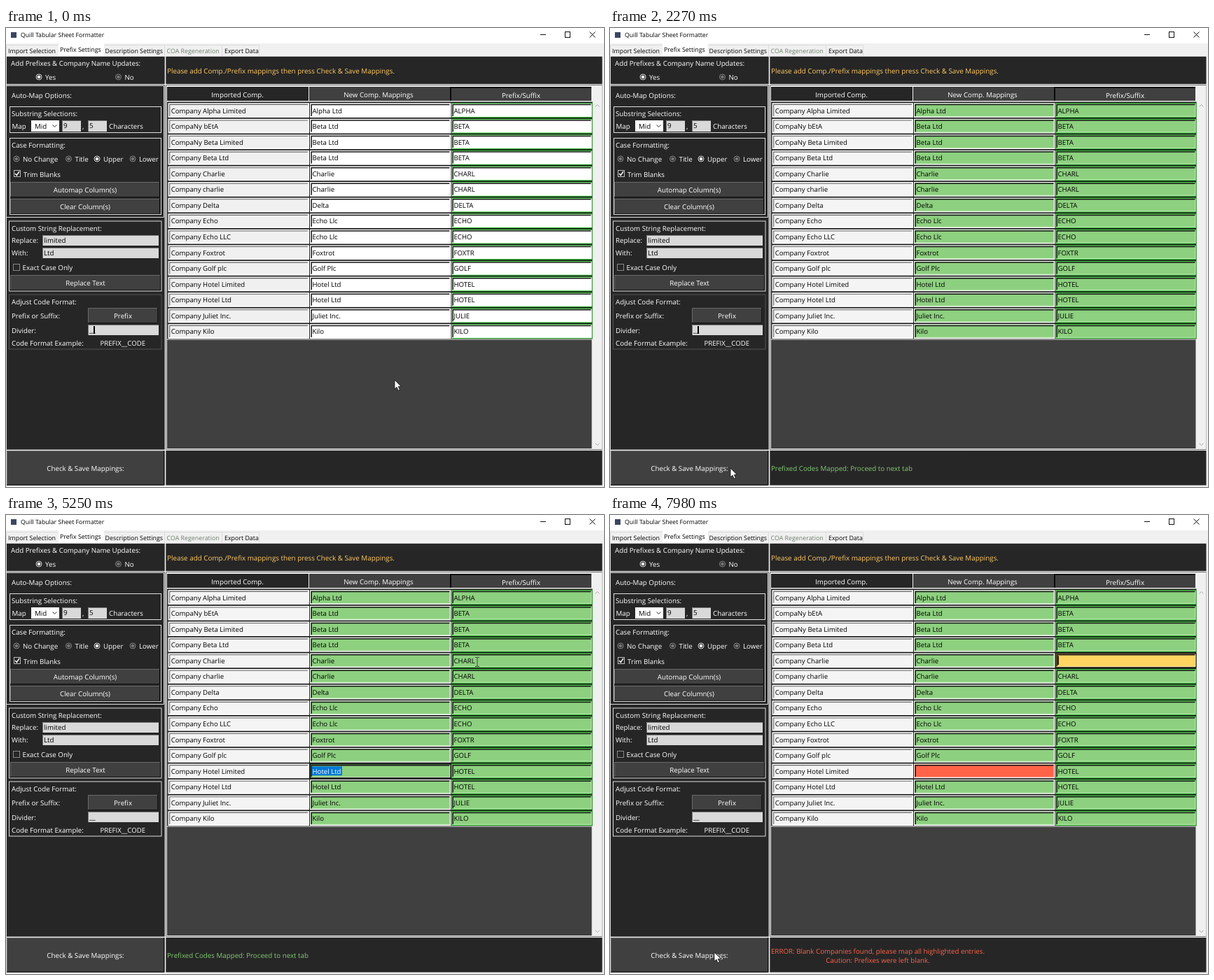
An HTML page for the animation above (8 s loop, 854 px wide and 656 px high).

```html
<!DOCTYPE html>
<html lang="en">
<head>
<meta charset="utf-8">
<title>Prefix settings</title>
<style>
html, body { margin: 0; width: 100%; height: 100%; overflow: hidden; background: #262626; }
svg { display: block; }
text { font-family: "Open Sans", "Noto Sans", sans-serif; text-rendering: geometricPrecision; white-space: pre; }
</style>
</head>
<body>
<svg id="stage" width="854" height="656" viewBox="0 0 854 656"></svg>
<script>
const DARK = '#262626', GREY = '#404040', GREEN = '#8dd07f', WHITE = '#fff', LINE = '#ddd';
const RING = '#34c434', FOCUS = '#1a1a1a';
const LOOP = 8000;
const out = [];
const add = s => out.push(s);
const rect = (x, y, w, h, fill, extra = '') =>
  add(`<rect x="${x}" y="${y}" width="${w}" height="${h}" fill="${fill}" ${extra}/>`);
const frame = (x, y, w, h, color, extra = '') =>
  rect(x + .5, y + .5, w - 1, h - 1, 'none', `stroke="${color}" ${extra}`);
const path = (d, color, width = 1, extra = '') =>
  add(`<path d="${d}" fill="none" stroke="${color}" stroke-width="${width}" ${extra}/>`);
const text = (x, y, s, fill = WHITE, size = 9.75, extra = '') =>
  add(`<text x="${x}" y="${y}" fill="${fill}" font-size="${size}" ${extra}>${s.replace(/&/g, '&amp;')}</text>`);
const MID = 'text-anchor="middle"';

function button(x, y, w, h, label, id = '') {
  rect(x, y, w, h, GREY, id && `id="${id}"`);
  path(`M${x + .5} ${y + h}V${y + .5}H${x + w}`, '#6a6a6a');
  path(`M${x} ${y + h - .5}H${x + w - .5}V${y}`, '#141414');
  text(x + w / 2, y + h / 2 + 3.8, label, WHITE, 9.75, MID + (id && ` id="${id}Text"`));
}
function entry(x, y, w, h, s) {
  rect(x, y, w, h, '#d9d9d9');
  path(`M${x + .5} ${y + h}V${y + .5}H${x + w}`, '#777');
  text(x + 2, y + h / 2 + 3.4, s, '#000');
}
function radio(x, y, label, on) {
  add(`<circle cx="${x}" cy="${y}" r="4" fill="${DARK}" stroke="${on ? LINE : '#888'}"/>`);
  add(`<circle cx="${x}" cy="${y}" r="2.3" fill="${on ? WHITE : '#777'}"/>`);
  text(x + 9, y + 4, label);
}

// Title bar and tabs
rect(0, 0, 854, 656, DARK);
rect(0, 0, 854, 22, WHITE);
rect(7, 6, 8, 8, '#3b4664');
text(21, 13.3, 'Quill Tabular Sheet Formatter', '#000', 8.7);
path('M763 9.5H771M833.5 5.5L841.5 13.5M841.5 5.5L833.5 13.5', '#111');
frame(798, 5, 8, 9, '#111');
rect(0, 22, 854, 18, '#f0f0f0');
rect(75, 22, 65, 18, WHITE);
path('M.5 40V24.5H74.5M140.5 24.5H361.5V40M226.5 25V40M308.5 25V40', '#dcdcdc');
[[3, 'Import Selection'], [77, 'Prefix Settings'], [141.5, 'Description Settings'],
 [229.5, 'COA Regeneration'], [312, 'Export Data']].forEach(([x, s], i) =>
  text(x, i === 1 ? 34.3 : 36, s, i === 3 ? '#6d7f6d' : '#000', 8.87));

// Panel borders
rect(0, 40, 854, .8, '#eee');
rect(0, 80, 852, 1.3, '#eee');
rect(0, 602.6, 852, 1.4, '#eee');
rect(0, 653.5, 854, 2.5, '#eee');
rect(226.7, 40, 1.6, 615, '#f4f4f4');
rect(851.5, 40, 2.5, 615, '#eee');
rect(0, 40, 1, 615, LINE);

// Left column
text(7, 54.3, 'Add Prefixes & Company Name Updates:');
radio(47, 70, 'Yes', true);
radio(160.5, 70, 'No');
path('M1 82.5H225.5V270.5H1', LINE);
text(8, 100, 'Auto-Map Options:');
frame(5, 112, 217, 38, LINE);
text(8, 126, 'Substring Selections:');
text(8.5, 144, 'Map');
rect(36, 132, 40, 16, WHITE);
text(41, 143.8, 'Mid', '#000');
path('M66.5 138.5L69.5 141.5L72.5 138.5', '#333');
entry(80, 132, 27, 16, '9');
text(109, 144, ',');
entry(117, 132, 27, 16, '5');
text(147, 144, 'Characters');
frame(5, 157, 217, 110, LINE);
text(8, 171, 'Case Formatting:');
radio(15, 187, 'No Change');
radio(89.5, 187, 'Title');
radio(130, 187, 'Upper', true);
radio(181, 187, 'Lower');
frame(11, 203, 10, 10, '#bbb');
path('M13 208L15.3 210.5L19 205', WHITE, 1.4);
text(25, 212.6, 'Trim Blanks');
button(6, 220, 214, 22, 'Automap Column(s)');
button(6, 244, 214, 22, 'Clear Column(s)');
frame(4, 275.5, 218.5, 101, LINE);
text(8, 290, 'Custom String Replacement:');
text(8, 307.2, 'Replace:');
entry(52, 296, 166, 15, 'limited');
text(8, 325.2, 'With:');
entry(52, 314, 166, 15, 'Ltd');
frame(10, 337, 10, 10, '#888');
text(23.5, 346, 'Exact Case Only');
button(6, 353, 215, 22, 'Replace Text');
frame(4, 380.5, 218.5, 79, '#555', 'id="codeBox"');
text(8, 395, 'Adjust Code Format:');
text(8, 415, 'Prefix or Suffix:');
button(117, 400, 100, 22, 'Prefix');
text(8, 436, 'Divider:');
entry(117, 424, 101, 15, '__');
rect(125, 426, 2, 11, '#000', 'id="divCaret"');
text(8, 454, 'Code Format Example:');
text(134.5, 454, 'PREFIX__CODE', WHITE, 9.6);
button(1, 604, 225, 49.5, 'Check & Save Mappings:', 'save');

// Table
text(230, 64.5, 'Please add Comp./Prefix mappings then press Check & Save Mappings.', '#ffc963', 9.86);
rect(229, 82, 622.5, 520, '#f0f0f0');
rect(230, 84, 202, 20, DARK);
rect(433, 84, 201, 20, GREY);
rect(634, 84, 202, 20, GREY);
path('M635 104V85H836', '#0a0a0a', 2);
text(330.5, 98.7, 'Imported Comp.', WHITE, 9.75, MID);
text(532, 98.7, 'New Comp. Mappings', WHITE, 9.75, MID);
text(735.5, 99.7, 'Prefix/Suffix', WHITE, 9.75, MID);
rect(230, 105.5, 607.5, 339, '#1d1d1d');
rect(230, 445.5, 606.5, 155.5, GREY);
path('M841.5 112.5L844.5 109.5L847.5 112.5M841.5 593.5L844.5 596.5L847.5 593.5', '#aaa');

const names = `Alpha Limited|Alpha Ltd
CompaNy bEtA|Beta Ltd
CompaNy Beta Limited|Beta Ltd
Beta Ltd|Beta Ltd
Charlie|Charlie
charlie|Charlie
Delta|Delta
Echo|Echo Llc
Echo LLC|Echo Llc
Foxtrot|Foxtrot
Golf plc|Golf Plc
Hotel Limited|Hotel Ltd
Hotel Ltd|Hotel Ltd
Juliet Inc.|Juliet Inc.
Kilo|Kilo`.split('\n').map(line => line.split('|'));
const COLS = [231.5, 434, 636];
const rowY = r => 107.2 + r * 22.57;

// Sunken cell: thin ring, dark top and left edge, light bottom and right edge
function cell(c, r, s) {
  const x = COLS[c], y = rowY(r), id = `${c}_${r}`, w = 201.5, h = 20.8;
  rect(x, y, w, h, c === 2 ? RING : WHITE, `id="edge${id}"`);
  rect(x + 1.1, y + 1.1, w - 2.2, h - 2.2, WHITE, `id="cell${id}"`);
  path(`M${x + 2.2} ${y + h - 2}V${y + 2.2}H${x + w - 2}`, c ? '#151515' : '#666', c ? 1.5 : 1.1);
  path(`M${x + 2} ${y + h - 1.7}H${x + w - 1.7}V${y + 2}`, WHITE, 1, 'stroke-opacity=".45"');
  text(x + (c ? 3.5 : 4.2), y + 14.3, s, '#000', 9.65, `id="text${id}"`);
}
// Text selection and caret of an edited cell
function editor(c, r, selWidth, s) {
  const x = COLS[c] + 3, y = rowY(r) + 3.8;
  rect(x, y, selWidth, 13, '#0078d7', `id="sel${c}"`);
  text(x + .5, y + 10.5, s, WHITE, 9.65, `id="selText${c}"`);
  rect(x, y, 1.6, 13, '#000', `id="caret${c}"`);
}
names.forEach(([from, to], r) => {
  const code = to.split(' ')[0].slice(0, 5).toUpperCase();
  const full = from.startsWith('CompaNy') ? from : 'Company ' + from;
  [full, to, code].forEach((s, c) => cell(c, r, s));
});
editor(1, 11, 43, 'Hotel Ltd');
editor(2, 4, 33, 'CHARL');

// Messages and pointer
text(230, 633, 'Prefixed Codes Mapped: Proceed to next tab', '#82cc74', 9.75, 'id="okMsg"');
add('<g id="errMsg">');
text(382.5, 627, 'ERROR: Blank Companies found, please map all highlighted entries.', '#ff6347', 9.75, MID);
text(382.5, 640, 'Caution: Prefixes were left blank.', '#ff6347', 9.75, MID);
add('</g><g id="pointer"><circle id="press" r="9.5" fill="#f5e620" fill-opacity=".75"/>');
add('<path id="arrow" d="M0 0V13L3 10.2L5.2 15L7.4 14L5.2 9.4H9.3Z" fill="#fff" stroke="#111" stroke-width=".8"/>');
path('M-3 -6.5H-1Q0 -6.5 0 -5.5Q0 -6.5 1 -6.5H3M0 -5.5V5.5M-3 6.5H-1Q0 6.5 0 5.5Q0 6.5 1 6.5H3', '#444', 1, 'id="beam"');
add('</g>');

const stage = document.getElementById('stage');
stage.innerHTML = out.join('');
const el = {};
stage.querySelectorAll('[id]').forEach(e => el[e.id] = e);
const show = (id, on) => el[id].setAttribute('visibility', on ? 'visible' : 'hidden');
const paint = (id, color) => el[id].setAttribute('fill', color);
const within = (t, ...spans) => spans.some(([a, b]) => t >= a && t < b);

// Pointer waypoints: time, x, y
const TRACK = [
  [560, 555, 503], [1330, 232, 501], [1860, 172, 629], [2480, 172, 629], [2920, 277, 632],
  [3050, 277, 632], [3560, 516, 390], [3750, 496, 362], [3990, 494, 365], [4550, 494, 365],
  [4690, 615, 350], [4810, 704, 333], [4960, 715, 264], [5250, 673, 210], [5840, 673, 210],
  [6160, 548, 200], [6380, 562, 228], [6530, 602, 364], [6620, 576, 405], [6700, 540, 435],
  [6950, 266, 617], [7000, 266, 617], [7190, 148, 640], [7350, 149, 625]
];
function pointerAt(t) {
  const i = TRACK.findIndex(p => p[0] > t);
  if (i < 0) return TRACK[TRACK.length - 1].slice(1);
  if (!i) return TRACK[0].slice(1);
  const [a, b] = [TRACK[i - 1], TRACK[i]];
  const u = (t - a[0]) / (b[0] - a[0]);
  const k = b[0] - a[0] > 300 ? u * u * (3 - 2 * u) : u;
  return [a[1] + (b[1] - a[1]) * k, a[2] + (b[2] - a[2]) * k];
}

function draw(t) {
  const mapped = t >= 2270, failed = t >= 7740;
  const focusHotel = within(t, [4160, 5580]), focusCode = t >= 5580;
  for (let r = 0; r < names.length; r++) {
    paint('cell0_' + r, mapped ? '#f4f4f4' : '#f0f0f0');
    for (const c of [1, 2]) paint(`cell${c}_${r}`, mapped ? GREEN : WHITE);
  }
  if (failed) {
    paint('cell1_11', '#ff6347');
    paint('cell2_4', '#ffd460');
  }
  paint('edge1_11', focusHotel ? FOCUS : WHITE);
  paint('edge2_4', focusCode ? FOCUS : RING);

  const pickHotel = within(t, [4340, 5290]), pickCode = within(t, [5740, 6450]);
  for (const [c, on] of [[1, pickHotel], [2, pickCode]]) {
    show('sel' + c, on);
    show('selText' + c, on);
  }
  show('text1_11', t < 5290 && !pickHotel);
  show('text2_4', t < 6450 && !pickCode);
  el.caret1.setAttribute('x', t < 5290 ? 479 : 437);
  el.caret2.setAttribute('x', 639.3);
  show('caret1', focusHotel && !pickHotel);
  show('caret2', t >= 6450 && !within(t, [7010, 7340]));
  show('divCaret', t < 4160 && (t < 70 || (t - 70) % 740 >= 320));
  el.codeBox.setAttribute('stroke', t < 4160 ? '#555' : LINE);

  const down = within(t, [2140, 2270], [7600, 7740]);
  paint('save', down ? '#f0f0f0' : GREY);
  paint('saveText', down ? '#000' : WHITE);
  el.saveText.setAttribute('transform', down ? 'translate(1 1)' : '');
  show('okMsg', mapped && !failed);
  show('errMsg', failed);

  const [x, y] = pointerAt(t);
  const typing = x > 434 && y < 444;
  el.pointer.setAttribute('transform', `translate(${x.toFixed(1)} ${y.toFixed(1)})`);
  show('arrow', !typing);
  show('beam', typing);
  show('press', down || within(t, [4160, 4260], [4340, 4440], [5580, 5660], [5740, 5820]));
}

const start = performance.now();
function tick() {
  draw((performance.now() - start) % LOOP);
  requestAnimationFrame(tick);
}
draw(0);
requestAnimationFrame(tick);
</script>
</body>
</html>
```
